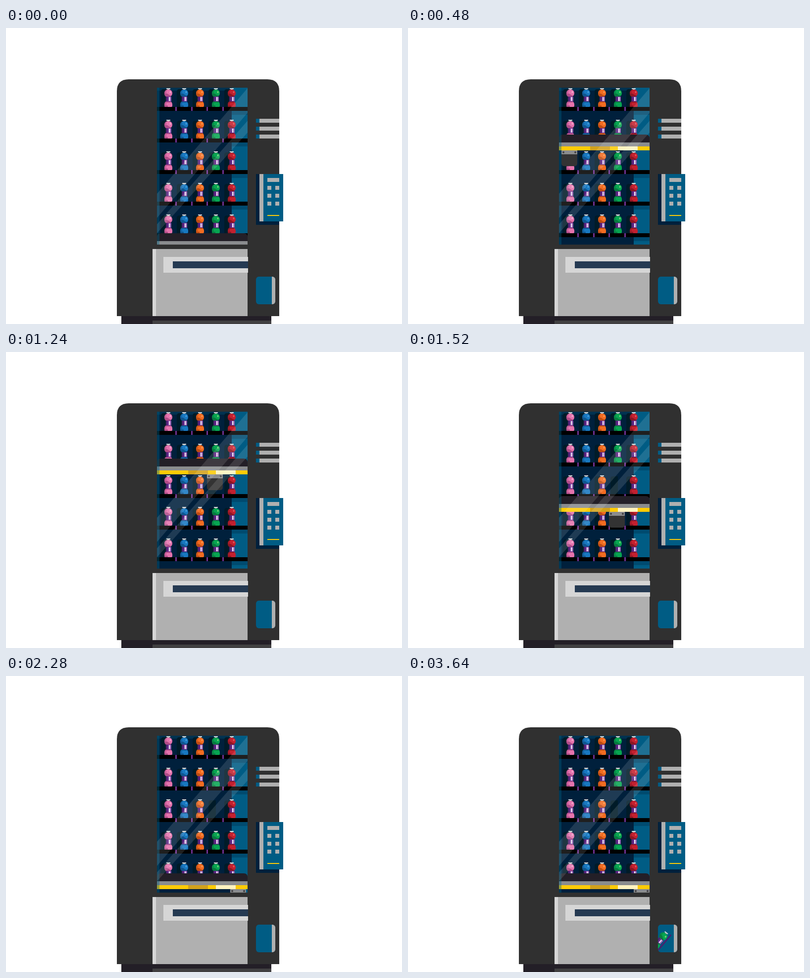
An HTML page for the animation above (3.68 s loop, 800x600 px).

```html
<!DOCTYPE html>
<html lang="en">
<head>
<meta charset="utf-8">
<title>Vending machine</title>
<style>
html, body { margin: 0; width: 100%; height: 100%; overflow: hidden; background: #fff; }
svg { display: block; width: 800px; height: 600px; }
</style>
</head>
<body>
<svg id="stage" viewBox="0 0 800 600" xmlns="http://www.w3.org/2000/svg"></svg>
<script>
const LOOP = 3680, STEP = 40;
const COLUMNS = [328, 360, 392, 424, 456];
const SHELVES = [160, 224, 288, 352, 416];
// body, shaded side, highlight
const DRINKS = [
  ['#e573ad', '#b04c87', '#f5a9cf'],
  ['#1878c0', '#10568f', '#4ba0da'],
  ['#f36c21', '#bd4c14', '#ff9950'],
  ['#07a551', '#087a3f', '#72cf75'],
  ['#c3202f', '#8d1724', '#e0585c']
];

const rect = (x, y, w, h, fill, more = '') =>
  `<rect x="${x}" y="${y}" width="${w}" height="${h}" fill="${fill}" ${more}/>`;
const path = (d, fill, more = '') => `<path d="${d}" fill="${fill}" ${more}/>`;

// Bottle standing on the origin, 38 px tall
function bottle([body, shade, shine]) {
  return rect(-4, -38, 8, 2, '#d5d7d9') + rect(-2, -36, 4, 3, '#a9abad') +
    path('M-3-35H3Q8-33 8-28Q8-24 5-22V-11Q8-9 8-6V-2Q8 0 6 0H-6Q-8 0-8-2V-6Q-8-9-5-11V-22Q-8-24-8-28Q-8-33-3-35Z', body) +
    path('M-8-27H-2Q1-24 5-23V-21H-5Q-8-23-8-27Z M-5-11H5V-9H-7Z M-8-3H-1V0H-6Q-8 0-8-3Z', shade) +
    path('M-3-35Q-8-33-8-28Q-8-24-5-22V-11Q-8-9-8-6V-2Q-8 0-6 0H-4V-34Z', shade, 'opacity=".55"') +
    rect(-5, -21, 11, 10, '#6a2c91') + rect(-5, -21, 3, 10, '#4b216d') +
    rect(1, -20, 2, 8, '#fff') + rect(4, -20, 1, 8, '#d9c6e8') +
    `<ellipse cx="4" cy="-30" rx="1.6" ry="2" fill="${shine}"/>`;
}

function shelf(y, row) {
  let out = rect(456, y + 8, 32, 8, '#004b70');
  COLUMNS.forEach((x, col) => {
    out += path(`M${x - 15} ${y}V${y - 31}Q${x - 15} ${y - 36} ${x - 9} ${y - 36}H${x}V${y}Z`, '#001b28');
    out += `<g id="b${row}${col}" transform="translate(${x} ${y})">${bottle(DRINKS[col])}</g>`;
  });
  out += rect(305, y, 183, 8, '#000');
  for (const x of [342, 374, 405, 437]) out += rect(x, y, 3, 8, '#6e3192');
  return out;
}

function cabinet() {
  let out = rect(233, 584, 303, 16, '#231f27') + rect(296, 593, 240, 7, '#414042') +
    path('M224 584V128Q224 104 248 104H528Q552 104 552 128V584Z', '#303030') +
    rect(296, 448, 192, 136, '#b0b0b0') + rect(296, 448, 7, 136, '#d6d6d6') +
    rect(318, 464, 171, 32, '#d6d6d6') + rect(337, 473, 152, 14, '#253a52');
  for (const y of [184, 200, 216])
    out += rect(505, y, 7, 8, '#005c84') + rect(512, y, 40, 8, '#b0b0b0');
  out += rect(505, 296, 47, 103, '#00203c') + rect(512, 296, 8, 96, '#b0b0b0') +
    rect(520, 296, 40, 96, '#005c84') + rect(528, 304, 24, 8, '#b0b0b0') +
    rect(528, 379, 24, 2, '#ffcb05');
  for (const y of [320, 336, 352])
    for (const x of [528, 544]) out += rect(x, y, 8, 8, '#b0b0b0');
  return out;
}

function lift() {
  return `<g id="lift"><g id="box">` +
    path('M0 8H32V42Q32 48 26 48H6Q0 48 0 42Z', '#333') +
    rect(0, 16, 32, 8, '#8a8c8e') +
    '<circle cx="4" cy="20" r="2" fill="#414042"/><circle cx="28" cy="20" r="2" fill="#414042"/></g>' +
    path('M305 0V-8Q305-16 313-16H480Q488-16 488-8V0Z', '#231f27') +
    rect(305, 0, 183, 8, '#8a8c8e') + rect(305, 8, 183, 8, '#ffcb05') +
    rect(368, 8, 40, 8, '#d2a11b') + rect(424, 8, 40, 8, '#fff3c0') + '</g>';
}

document.getElementById('stage').innerHTML = `
  <defs>
    <clipPath id="glass"><rect x="305" y="121" width="183" height="318"/></clipPath>
    <clipPath id="chute"><rect x="505" y="504" width="39" height="56" rx="6"/></clipPath>
  </defs>
  ${cabinet()}
  <g clip-path="url(#glass)">
    ${rect(305, 121, 183, 318, '#00203c')}
    ${rect(456, 121, 32, 318, '#005c84')}
    ${rect(305, 121, 151, 6, '#003250')}
    ${SHELVES.map(shelf).join('')}
    ${lift()}
    ${rect(305, 121, 5, 318, '#00607f', 'opacity=".4"')}
    ${path('M488 122V172L305 385V336Z M488 188V212L305 416V398Z', '#fff', 'opacity=".12"')}
  </g>
  <g clip-path="url(#chute)">
    ${rect(505, 504, 39, 56, '#005c84')}
    <g id="flap">
      <g transform="translate(-10 -1)">${bottle(DRINKS[3])}</g>
      ${rect(-1.5, -41, 3, 41, '#4b216d')}
    </g>
    ${rect(537, 504, 7, 56, '#b0b0b0')}
  </g>`;

const [liftEl, boxEl, flapEl, soldEl] =
  ['lift', 'box', 'flap', 'b23'].map(id => document.getElementById(id));

// Eased 0..1 between two times
function ease(t, from, to) {
  const p = Math.min(1, Math.max(0, (t - from) / (to - from)));
  return (1 - Math.cos(Math.PI * p)) / 2;
}

function draw(t) {
  const y = 432 - 200 * ease(t, 60, 460) + 192 * ease(t, 1320, 1780) - 8 * ease(t, 1780, 1900);
  const x = 310 + 96 * ease(t, 600, 1060) + 50 * ease(t, 1960, 2340);
  const tilt = -4 + 44 * ease(t, 2560, 3000);
  liftEl.setAttribute('transform', `translate(0 ${Math.round(y)})`);
  boxEl.setAttribute('transform', `translate(${Math.round(x)} 0)`);
  boxEl.style.display = t < 80 ? 'none' : '';
  soldEl.style.display = t < 1200 ? '' : 'none';
  flapEl.style.display = t < 2560 ? 'none' : '';
  flapEl.setAttribute('transform', `translate(505 556) rotate(${tilt.toFixed(2)})`);
}

const start = performance.now();
function tick() {
  const t = (performance.now() - start) % LOOP;
  draw(t < 2 * STEP ? 0 : Math.floor(t / STEP) * STEP);
  requestAnimationFrame(tick);
}
tick();
</script>
</body>
</html>
```
